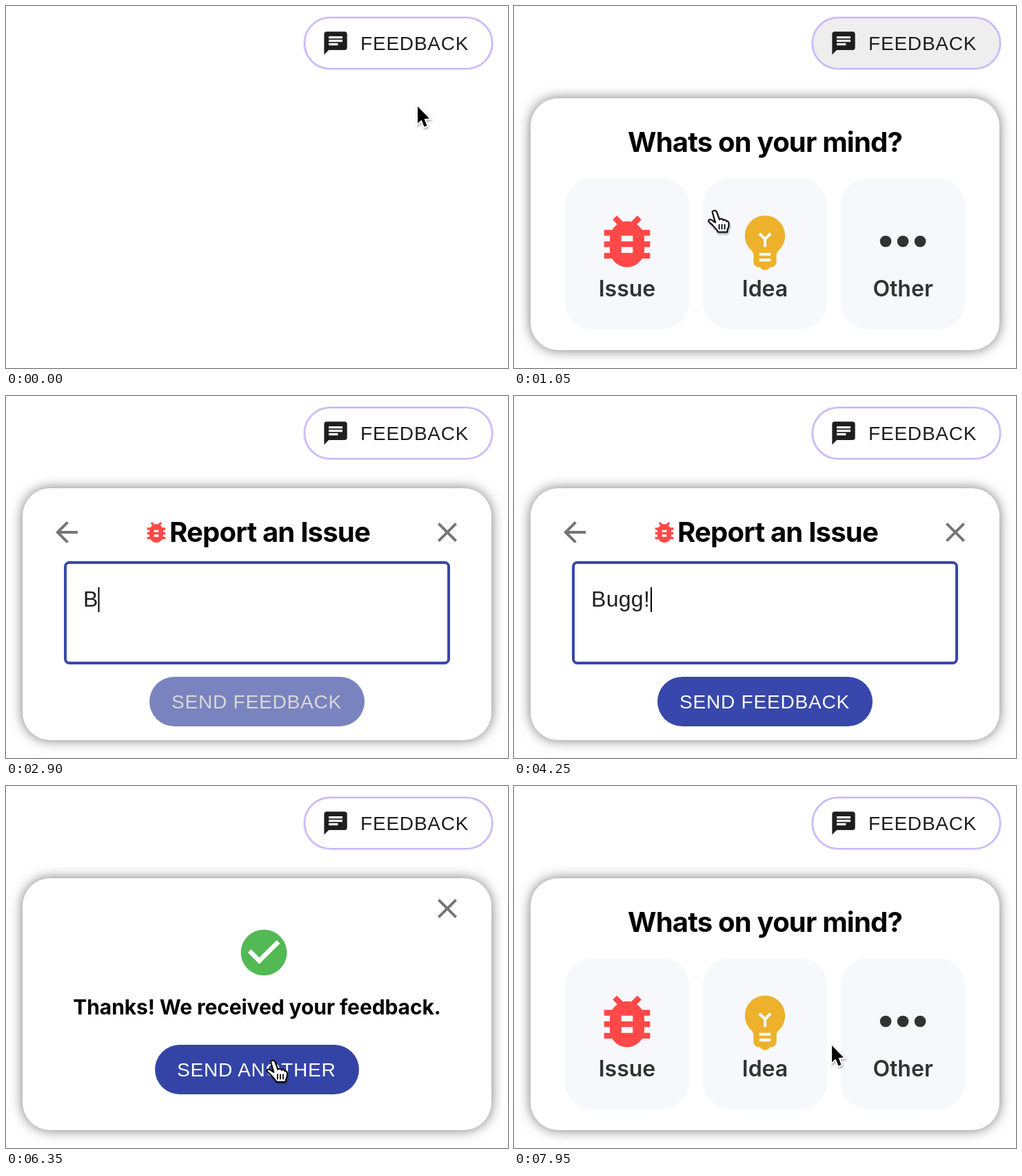
An HTML page for the animation above (8 s loop, 728 by 526 pixels).

```html
<!DOCTYPE html>
<html lang="en">
<head>
<meta charset="utf-8">
<title>Feedback widget</title>
<style>
  html, body { margin: 0; width: 100%; height: 100%; overflow: hidden; background: #fff; }
  svg { display: block; width: 728px; height: 526px; }
  .ui { font-family: "Liberation Sans", Arial, sans-serif; font-size: 28px; letter-spacing: .8px; }
  .input { font-size: 32px; letter-spacing: .3px; }
  .head { font-family: Inter, sans-serif; font-weight: 700; font-size: 40px; letter-spacing: -.8px; }
  .thanks { font-size: 30px; letter-spacing: -.1px; }
  .label { font-family: Inter, sans-serif; font-weight: 600; font-size: 32px; fill: #323232; }
  .mid { text-anchor: middle; }
</style>
</head>
<body>
<svg viewBox="0 0 728 526">
  <defs>
    <filter id="glow" x="-10%" y="-15%" width="120%" height="130%"><feGaussianBlur stdDeviation="9"/></filter>
    <filter id="drop" x="-50%" y="-50%" width="200%" height="200%">
      <feDropShadow dx="1" dy="2" stdDeviation="1.5" flood-opacity=".35"/>
    </filter>
    <clipPath id="clipOpen"><rect x="434" y="18" width="270" height="72" rx="36"/></clipPath>
    <clipPath id="clipSend"><rect x="208" y="408" width="312" height="72" rx="36"/></clipPath>
    <clipPath id="clipAgain"><rect x="216" y="376" width="296" height="72" rx="36"/></clipPath>

    <path id="bug" d="M20 8h-2.81c-.45-.78-1.07-1.45-1.82-1.96L17 4.41 15.59 3l-2.17 2.17C12.96 5.06 12.49 5 12 5s-.96.06-1.41.17L8.41 3 7 4.41l1.62 1.63C7.88 6.55 7.26 7.22 6.81 8H4v2h2.09c-.05.33-.09.66-.09 1v1H4v2h2v1c0 .34.04.67.09 1H4v2h2.81c1.04 1.79 2.97 3 5.19 3s4.15-1.21 5.19-3H20v-2h-2.09c.05-.33.09-.66.09-1v-1h2v-2h-2v-1c0-.34-.04-.67-.09-1H20V8zm-6 8h-4v-2h4v2zm0-4h-4v-2h4v2z"/>
    <path id="bulb" d="M12 3c-.46 0-.93.04-1.4.14-2.76.53-4.96 2.76-5.48 5.52-.48 2.61.48 5.01 2.22 6.56.43.38.66.91.66 1.47V19c0 1.1.9 2 2 2h.28c.35.6.98 1 1.72 1s1.38-.4 1.72-1H14c1.1 0 2-.9 2-2v-2.31c0-.55.22-1.09.64-1.46C18.09 13.95 19 12.08 19 10c0-3.87-3.13-7-7-7zm2 16h-4v-1h4v1zm0-2h-4v-1h4v1zm-1.5-5.59V14h-1v-2.59L9.67 9.59l.71-.71L12 10.5l1.62-1.62.71.71-1.83 1.82z"/>
    <g id="dots"><circle cx="6" cy="12" r="2"/><circle cx="12" cy="12" r="2"/><circle cx="18" cy="12" r="2"/></g>
    <path id="chat" d="M20 2H4c-1.1 0-1.99.9-1.99 2L2 22l4-4h14c1.1 0 2-.9 2-2V4c0-1.1-.9-2-2-2zM6 9h12v2H6V9zm8 5H6v-2h8v2zm4-6H6V6h12v2z"/>
    <path id="back" d="M20 11H7.83l5.59-5.59L12 4l-8 8 8 8 1.41-1.41L7.83 13H20v-2z"/>
    <path id="close" d="M19 6.41L17.59 5 12 10.59 6.41 5 5 6.41 10.59 12 5 17.59 6.41 19 12 13.41 17.59 19 19 17.59 13.41 12z"/>
    <path id="check" d="M12 2C6.48 2 2 6.48 2 12s4.48 10 10 10 10-4.48 10-10S17.52 2 12 2zm-2 15l-5-5 1.41-1.41L10 14.17l7.59-7.59L19 8l-9 9z"/>
  </defs>

  <g fill="none" stroke="#c6b6fb">
    <rect x="431.5" y="15.5" width="275" height="77" rx="38.5" stroke-width="1.5" opacity=".4"/>
    <rect x="433" y="17" width="272" height="74" rx="37" stroke-width="2.2"/>
  </g>
  <g clip-path="url(#clipOpen)"><circle id="rippleOpen" cx="538" cy="80"/></g>
  <use href="#chat" fill="#1e1e1e" transform="translate(458 34) scale(1.6667)"/>
  <text class="ui" x="514" y="64" fill="#1e1e1e">FEEDBACK</text>

  <g id="panel">
    <rect x="24" y="134" width="680" height="366" rx="40" fill="#777" filter="url(#glow)"/>
    <rect x="24" y="134" width="680" height="366" rx="40" fill="#fff"/>

    <g id="menu">
      <text class="head mid" x="364" y="212">Whats on your mind?</text>
      <g id="cards"></g>
    </g>

    <g id="form">
      <use href="#back" fill="#757575" transform="translate(64 174) scale(2)"/>
      <use href="#bug" fill="#ff4848" transform="translate(198 178) scale(1.6667)"/>
      <text class="head" x="237" y="212">Report an Issue</text>
      <use href="#close" fill="#757575" transform="translate(616 174) scale(2)"/>
      <rect x="86" y="242" width="556" height="146" rx="6" fill="#fff" stroke="#3747ab" stroke-width="4"/>
      <text id="field" class="ui input" x="112" y="306"></text>
      <rect id="caret" y="278" width="2" height="36"/>
      <rect id="send" x="208" y="408" width="312" height="72" rx="36"/>
      <g clip-path="url(#clipSend)"><circle id="rippleSend" cx="326" cy="440"/></g>
      <text id="sendText" class="ui" x="240" y="454">SEND FEEDBACK</text>
    </g>

    <g id="done">
      <use href="#close" fill="#757575" transform="translate(616 154) scale(2)"/>
      <use href="#check" fill="#52b955" transform="translate(334 202) scale(3.3333)"/>
      <text class="head thanks mid" x="364" y="332">Thanks! We received your feedback.</text>
      <rect id="again" x="216" y="376" width="296" height="72" rx="36"/>
      <g clip-path="url(#clipAgain)"><circle id="rippleAgain" cx="408" cy="407"/></g>
      <text class="ui" x="248" y="422" fill="#fff">SEND ANOTHER</text>
    </g>
  </g>

  <g id="cursor">
    <path id="arrow" d="M0 0V24.500L5.500 19.500 9.500 29.500 13.500 28 9.500 18 17 17.500Z" stroke="#fff" stroke-width="3.500" paint-order="stroke" filter="url(#drop)"/>
    <g id="hand" stroke="#000" stroke-width="2" stroke-linejoin="round" stroke-linecap="round" filter="url(#drop)">
      <path fill="#fff" d="M-2.500 1.500C-1-1 3-1 4 2L8 13C9 11 13 11 13.500 14 14.500 12 17.500 13 18 15.500 19.500 14 21.500 16 21.500 19 22 23 20.500 25 19.500 27.500L19 31H6C5 28 2 26-1 22-3 19-8 17-8 14.500-8 12-4 12-1 15L2 17Z"/>
      <path d="M7.500 20v6.500M11.500 20v6.500M15.500 20v6.500" fill="none" stroke-width="1.800"/>
    </g>
    <g id="beam" fill="none" stroke-linecap="round"></g>
  </g>
</svg>

<script>
const LOOP = 8000;
const $ = id => document.getElementById(id);
const set = (id, attrs) => { for (const k in attrs) $(id).setAttribute(k, attrs[k]); };
const show = (id, on) => set(id, { display: on ? 'inline' : 'none' });
const clamp = v => Math.max(0, Math.min(1, v));
const ramp = (t, start, dur) => clamp((t - start) / dur);
const smooth = p => p * p * (3 - 2 * p);
const easeOut = p => 1 - (1 - p) * (1 - p);
const within = (t, a, b) => t >= a && t < b;
const mix = (a, b, p) => 'rgb(' + a.map((v, i) => Math.round(v + (b[i] - v) * p)) + ')';

const BLUE = [55, 71, 171], NAVY = [42, 54, 144], GREY = [220, 220, 220];
const CARD = [247, 248, 252], CARD_HOVER = [234, 236, 245];

const cards = [
  ['Issue', 'bug', '#ff4848'],
  ['Idea', 'bulb', '#edb12b'],
  ['Other', 'dots', '#323232']
];
$('cards').innerHTML = cards.map(([name, icon, color], i) => {
  const x = 74 + 200 * i;
  return `<rect id="card${i}" x="${x}" y="250" width="180" height="220" rx="40"/>
    <use href="#${icon}" fill="${color}" transform="translate(${x + 40} 292) scale(4.1667)"/>
    <text class="label mid" x="${x + 90}" y="422">${name}</text>`;
}).join('');

const beamPath = 'M-6-16C-2-16 0-14 0-11V11C0 14-2 16-6 16M6-16C2-16 0-14 0-11M0 11C0 14 2 16 6 16M-3 1H3';
$('beam').innerHTML = `<path d="${beamPath}" stroke="#fff" stroke-width="4"/><path d="${beamPath}" stroke="#000" stroke-width="2"/>`;

// time, x, y of the pointer tip
const route = [
  [0, 597, 146], [300, 538, 72], [450, 538, 72], [600, 538, 76], [750, 533, 85],
  [1200, 205, 372], [1350, 205, 372], [1600, 258, 354], [4600, 258, 354],
  [4950, 326, 440], [5600, 325, 439], [5900, 352, 481], [6250, 380, 480],
  [6500, 398, 250], [6800, 400, 400], [7050, 408, 407], [7200, 408, 407],
  [7500, 414, 400], [7700, 414, 400], [7900, 461, 377], [LOOP, 461, 377]
];

function pointerAt(t) {
  const i = Math.max(1, route.findIndex(k => k[0] > t));
  const [t0, x0, y0] = route[i - 1], [t1, x1, y1] = route[i];
  const p = smooth(ramp(t, t0, t1 - t0));
  return [x0 + (x1 - x0) * p, y0 + (y1 - y0) * p];
}

// 0..1 strength for a hover lasting from a to b
const hover = (t, a, b) => Math.min(ramp(t, a, 200), 1 - ramp(t, b, 150));

function ripple(id, t, start, size, color, alpha) {
  const grow = easeOut(ramp(t, start, 460));
  const fade = 1 - ramp(t, start + 460, 350);
  set(id, { r: size * grow, fill: color, opacity: alpha * fade });
}

const TEXT = 'Bugg!';
const keys = [2750, 2950, 3100, 3300, 4100];
const caretX = [112, 133.5, 151.5, 170, 188, 198];
const caretOn = [[1600, 2100], [2600, 3800], [4100, 4600]];

function pointerShape(t, view, x, y) {
  const inside = (l, top, r, b) => x >= l && x <= r && y >= top && y <= b;
  if (view === 'none') return inside(434, 18, 704, 90) ? 'hand' : 'arrow';
  if (view === 'menu') {
    if (t < 900) return 'arrow';
    return [0, 1, 2].some(i => inside(74 + 200 * i, 250, 254 + 200 * i, 470)) ? 'hand' : 'arrow';
  }
  if (view === 'form') {
    if (within(t, 2100, 4600)) return '';
    if (inside(84, 240, 644, 390)) return 'beam';
    return inside(208, 408, 520, 480) ? 'hand' : 'arrow';
  }
  return inside(216, 376, 512, 448) ? 'hand' : 'arrow';
}

function render(t) {
  const view = t < 590 ? 'none' : t < 1375 ? 'menu' : t < 5450 ? 'form' : t < 7150 ? 'done' : 'menu';
  for (const v of ['menu', 'form', 'done']) show(v, v === view);

  const enter = easeOut(ramp(t, 590, 365));
  set('panel', { opacity: enter, transform: `translate(${150 * (1 - enter)} 0)` });
  ripple('rippleOpen', t, 480, 180, '#000', .1);

  set('card0', { fill: mix(CARD, CARD_HOVER, hover(t, 1080, 1375)) });
  set('card1', { fill: mix(CARD, CARD_HOVER, hover(t, 7200, 7720)) });
  set('card2', { fill: mix(CARD, CARD, 0) });

  const typed = keys.filter(k => t >= k).length;
  $('field').textContent = typed ? TEXT.slice(0, typed) : 'i noticed that...';
  set('field', { fill: typed ? '#1e1e1e' : '#9c9c9c' });
  set('caret', { x: caretX[typed] });
  show('caret', caretOn.some(([a, b]) => within(t, a, b)));

  const active = ramp(t, 2750, 250), over = hover(t, 4830, 5450);
  set('send', { fill: over > 0 ? mix(BLUE, NAVY, over) : mix(GREY, BLUE, active) });
  set('sendText', { fill: mix([160, 160, 160], [255, 255, 255], active) });
  ripple('rippleSend', t, 5100, 235, '#fff', .25);

  const again = Math.max(hover(t, 5600, 5690), hover(t, 6310, 6380), hover(t, 6690, 7400));
  set('again', { fill: mix(BLUE, NAVY, again) });
  ripple('rippleAgain', t, 7060, 220, '#fff', .25);

  const [x, y] = pointerAt(t), shape = pointerShape(t, view, x, y);
  set('cursor', { transform: `translate(${x} ${y})` });
  for (const s of ['arrow', 'hand', 'beam']) show(s, s === shape);
}

let origin;
function tick(now) {
  origin ??= now;
  render((now - origin) % LOOP);
  requestAnimationFrame(tick);
}
render(0);
requestAnimationFrame(tick);
</script>
</body>
</html>
```
